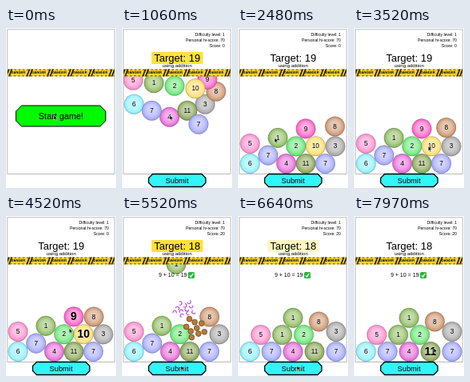
Write an HTML page with a canvas that moves like this. It is 138 by 200 pixels and loops after 8 s.

```html
<!DOCTYPE html>
<html lang="en">
<head>
<meta charset="utf-8">
<title>Number bubbles</title>
<style>
html, body { margin: 0; width: 100%; height: 100%; overflow: hidden; background: #fff; }
canvas { display: block; width: 138px; height: 200px; }
</style>
</head>
<body>
<canvas id="stage"></canvas>
<script>
const canvas = document.getElementById('stage');
const ctx = canvas.getContext('2d');
const dpr = window.devicePixelRatio || 1;
canvas.width = 138 * dpr;
canvas.height = 200 * dpr;

const LOOP = 8, START = 0.225, SUBMIT = 5.1;
const R = 12.5, GRAVITY = 244, DROP = 80, TAPE_PITCH = 25.8;
const pickTime = { 10: 3.7, 9: 4.3, 11: 7.85 };
const palette = ['', '#82b450', '#5ae468', '#a0a0a0', '#e45cd4', '#ff84c8', '#84f0ff',
  '#9ca0ff', '#c88a60', '#ff50c0', '#ffdc60', '#7e9e48'];

const clamp = v => Math.max(0, Math.min(1, v));
const ease = v => (v = clamp(v), v * v * (3 - 2 * v));
const mix = (a, b, p) => a + (b - a) * p;
const mixPoint = (a, b, p) => [mix(a[0], b[0], p), mix(a[1], b[1], p)];

// Resting places follow from the balls underneath
const onFloor = x => [x, 182 - R];
const onTop = ([x, y]) => [x, y - 2 * R];
function between([ax, ay], [bx, by]) {
  const dx = bx - ax, dy = by - ay, d = Math.hypot(dx, dy);
  const h = Math.sqrt(4 * R * R - d * d / 4) / d;
  return [(ax + bx) / 2 + dy * h, (ay + by) / 2 - dx * h];
}

function firstPile() {
  const p = { 6: onFloor(15) };
  ['4', '11', '7b'].forEach((id, i) => p[id] = onFloor(60.5 + 24.5 * i));
  p[7] = between(p[6], p[4]);
  p[5] = onTop(p[6]);
  p[2] = between(p[4], p[11]);
  p[10] = between(p[11], p['7b']);
  p[3] = between(p['7b'], onFloor(134.5));
  p[1] = between(p[7], p[2]);
  p[9] = between(p[2], p[10]);
  p[8] = onTop(p[3]);
  return p;
}

function lastPile() {
  const p = {};
  ['6', '7', '4', '11', '7b'].forEach((id, i) => p[id] = onFloor(15 + 27 * i));
  p[5] = between(p[6], p[7]);
  p[1] = between(p[7], p[4]);
  p[2] = between(p[4], p[11]);
  p[3] = onTop(p['7b']);
  p[8] = between(p[2], p[3]);
  p['1b'] = between(p[1], p[2]);
  return p;
}

// The falling swarm: a slanted row, a sagging row and two strays
function swarm() {
  const p = { 9: [107, 64], '7b': [96, 120] };
  [5, 1, 2, 10, 8].forEach((id, i) => p[id] = [14 + 26 * i, 65 + 3.5 * i]);
  [6, 7, 4, 11, 3].forEach((id, i) =>
    p[id] = [15 + 22.3 * i, 95 + 16 * Math.sin(Math.PI * i / 4) ** 2]);
  return p;
}

const air = swarm(), rest = firstPile(), end = lastPile();
const beside = ([x, y]) => [x - 4, y];
const pointerStops = [
  [2.4, beside(rest[1])], [3.45, beside(rest[10])], [4.2, beside(rest[9])],
  [5, [74, 187]], [7.75, [100, 165]]
];

function text(str, x, y, size, align = 'center', weight = '') {
  ctx.font = `${weight} ${size}px "Liberation Sans", Arial, sans-serif`;
  ctx.textAlign = align;
  ctx.textBaseline = 'middle';
  ctx.fillStyle = '#000';
  ctx.fillText(str, x, y);
}

function outline(fill, stroke, width) {
  ctx.fillStyle = fill;
  ctx.fill();
  ctx.strokeStyle = stroke;
  ctx.lineWidth = width;
  ctx.stroke();
}

function button(x, y, w, h, cut, color, line) {
  ctx.beginPath();
  [[cut, 0], [w - cut, 0], [w, cut], [w, h - cut], [w - cut, h], [cut, h], [0, h - cut], [0, cut]]
    .forEach(([dx, dy]) => ctx.lineTo(x + dx, y + dy));
  ctx.closePath();
  outline(color, '#000', line);
}

function tape() {
  ctx.save();
  ctx.beginPath();
  ctx.rect(2, 51.5, 134, 9);
  ctx.clip();
  ctx.fillStyle = '#f8d32c';
  ctx.fillRect(2, 51, 134, 10);
  ctx.strokeStyle = '#26220f';
  ctx.lineWidth = 1;
  ctx.setLineDash([2.6, 2.6]);
  ctx.strokeRect(0, 52, 140, 8);
  ctx.setLineDash([]);
  ctx.lineWidth = 1.7;
  for (let x = 15; x < 150; x += TAPE_PITCH) {
    ctx.beginPath();
    for (const dx of [-15, -11.4]) {
      ctx.moveTo(x + dx, 61);
      ctx.lineTo(x + dx + 4, 51);
    }
    ctx.stroke();
    text('DANGER', x + 0.4, 56.2, 4.1, 'center', 'bold');
  }
  ctx.restore();
}

// Free fall from y0 to the floor, followed by one small bounce
function fall(y0, floor, t) {
  const landing = Math.sqrt(2 * (floor - y0) / GRAVITY);
  if (t < landing) return y0 + GRAVITY / 2 * t * t;
  const s = t - landing;
  return floor - Math.max(0, 0.2 * GRAVITY * landing * s - GRAVITY / 2 * s * s);
}

function drawBall([x, y], label, picked) {
  ctx.beginPath();
  ctx.arc(x, y, R - 0.2, 0, 7);
  ctx.fillStyle = palette[label];
  ctx.fill();
  const shine = ctx.createRadialGradient(x, y - 2, 1, x, y, R);
  shine.addColorStop(0, 'rgba(255,255,255,.6)');
  shine.addColorStop(0.55, 'rgba(255,255,255,.42)');
  shine.addColorStop(0.85, 'rgba(255,255,255,.15)');
  shine.addColorStop(1, 'rgba(40,40,40,.15)');
  outline(shine, 'rgba(80,80,80,.4)', 0.6);
  text(label, x, y + 0.3, picked ? 14 : 8.3, 'center', picked ? 'bold' : '');
}

function burst([x, y], count, age, drawPiece) {
  if (age > 1) return;
  ctx.globalAlpha = 1 - ease((age - 0.5) * 2);
  for (let i = 0; i < count; i++) {
    const angle = i * 2.4;
    const reach = (4 + age * 24) * Math.sqrt((i + 0.5) / count);
    ctx.beginPath();
    drawPiece(x - 16 * age + Math.cos(angle) * reach, y - 18 * age + Math.sin(angle) * reach, angle);
  }
  ctx.globalAlpha = 1;
}

function curl(x, y, angle) {
  ctx.arc(x, y * 0.75 + 28, 2.2, angle, angle + 4);
  outline('#fff', '#c060e0', 1.3);
}

function crumb(x, y) {
  ctx.arc(x, y, 3.4, 0, 7);
  outline('#b47c3c', '#70481c', 0.8);
}

function ballPlace(id, t) {
  if (id === '1b') return [mix(68, end[id][0], ease((t - 5.6) / 0.8)), fall(38.5, end[id][1], t - SUBMIT)];
  let place = [
    mix(air[id][0], rest[id][0], ease((t - 1.06) / 0.6)),
    fall(air[id][1] - DROP, rest[id][1], t - 0.25)
  ];
  // The 8 rolls slowly into the gap beside it
  if (id === '8') place = mixPoint(place, between(rest[10], rest[3]), ease((t - 2.2) / 2.6));
  return t < SUBMIT ? place : mixPoint(place, end[id], ease((t - 5.6) / 0.75));
}

function drawBalls(t) {
  ctx.save();
  ctx.beginPath();
  ctx.rect(2, 52, 134, 130.5);
  ctx.clip();
  const done = t >= SUBMIT;
  for (const id in done ? end : rest) {
    const label = parseInt(id);
    drawBall(ballPlace(id, t), label, t >= pickTime[label]);
  }
  if (done) {
    burst(rest[9], 11, t - SUBMIT, curl);
    burst(rest[10], 9, t - SUBMIT, crumb);
  }
  ctx.restore();
}

function checkMark(x, y) {
  ctx.fillStyle = '#28b83c';
  ctx.beginPath();
  ctx.roundRect(x, y, 8, 8, 1.5);
  ctx.fill();
  ctx.strokeStyle = '#fff';
  ctx.lineWidth = 1.2;
  ctx.beginPath();
  ctx.moveTo(x + 1.8, y + 4.3);
  ctx.lineTo(x + 3.4, y + 6.2);
  ctx.lineTo(x + 6.3, y + 1.8);
  ctx.stroke();
}

function pointer(t) {
  const [x, y] = pointerStops.reduce(
    (from, [arrival, to]) => mixPoint(from, to, ease((t - arrival) / 0.7 + 1)), [60, 109]);
  ctx.beginPath();
  [[0, 0], [0, 6], [1.4, 4.8], [2.4, 7], [3.3, 6.6], [2.4, 4.5], [4.2, 4.3]]
    .forEach(([dx, dy]) => ctx.lineTo(x + dx, y + dy));
  ctx.closePath();
  outline('#000', '#fff', 0.5);
}

function drawGame(t) {
  const done = t >= SUBMIT;
  ['Difficulty level: 1', 'Personal hi-score: 70', 'Score: ' + (done ? 20 : 0)]
    .forEach((line, i) => text(line, 129, 8.5 + 7.25 * i, 5.2, 'right'));

  const age = t - (done ? SUBMIT : START);
  ctx.globalAlpha = 1 - clamp((age - 0.8) / 1.05);
  ctx.fillStyle = '#ffe135';
  ctx.fillRect(37, 30, 64.5, 15);
  ctx.globalAlpha = 1;
  text('Target: ' + (done ? 18 : 19), 69.2, 38, 13);
  text('using addition', 69.2, 47, 6);

  drawBalls(t);
  tape();
  if (done) {
    text('9 + 10 = 19', 46, 74, 7, 'left');
    checkMark(83, 70);
  }
  button(33.5, 182.5, 71.5, 16, 5, '#30f6f8', 1.3);
  text('Submit', 69, 191, 9.3);
}

function draw(t) {
  ctx.setTransform(dpr, 0, 0, dpr, 0, 0);
  ctx.fillStyle = '#fff';
  ctx.fillRect(0, 0, 138, 200);
  ctx.strokeStyle = '#aaa';
  ctx.lineWidth = 0.8;
  ctx.strokeRect(1.8, 1.8, 134.4, 180.7);
  if (t < START) {
    tape();
    button(12.5, 97, 112.5, 26, 7, '#00fa00', 1);
    text('Start game!', 69, 110.5, 10.9);
  } else {
    drawGame(t);
  }
  pointer(t);
}

const begin = performance.now();
function tick() {
  draw((performance.now() - begin) / 1000 % LOOP);
  requestAnimationFrame(tick);
}
tick();
</script>
</body>
</html>
```
